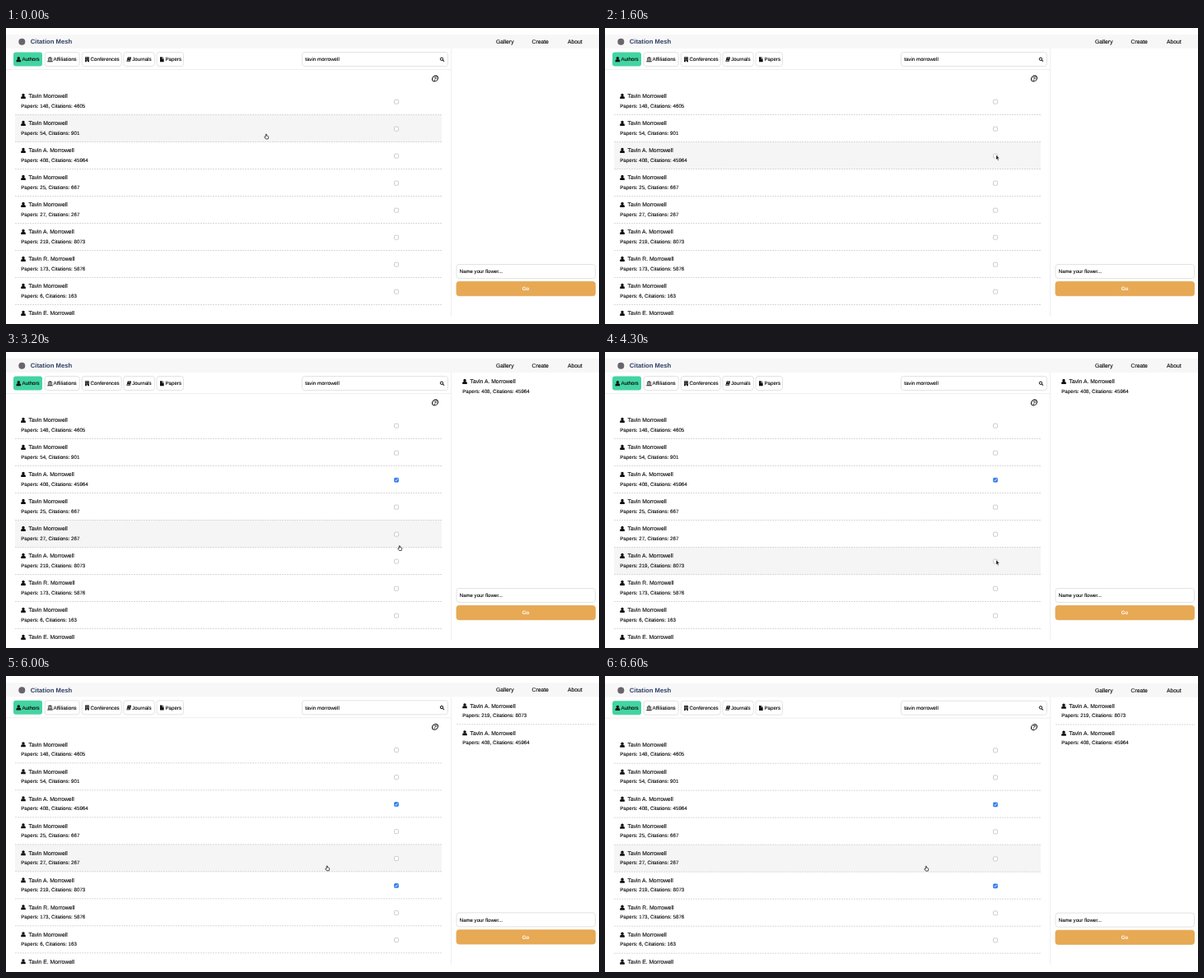
An HTML page for the animation above (6.7 s loop, 720 px wide and 360 px high).

```html
<!DOCTYPE html>
<html lang="en">
<head>
<meta charset="utf-8">
<title>Citation Mesh</title>
<style>
  html, body { margin: 0; width: 100%; height: 100%; overflow: hidden; background: #fff; }
  svg { display: block; width: 720px; height: 360px; font-family: "Liberation Sans", Arial, sans-serif; fill: #111; }
  text { text-rendering: geometricPrecision; stroke: currentColor; stroke-width: .12; }
  .box { fill: #fff; stroke: #dcdcdc; stroke-width: .8; }
  .rule { stroke: #efefef; }
  .dash { stroke: #cfcfcf; stroke-width: .8; stroke-dasharray: 2 1; }
  .check rect { fill: #fff; stroke: #b8b8b8; stroke-width: .7; }
  .check path { fill: none; stroke: none; }
  .check.on rect { fill: #2f7cec; stroke: #2f7cec; }
  .check.on path { stroke: #fff; stroke-width: .9; }
  .strong { font-weight: 700; stroke: none; }
</style>
</head>
<body>
<svg id="stage" viewBox="0 0 720 360"></svg>
<script>
const LOOP = 6700, STEP = 100, ROW = 33, TOP = 72.5;

// middle initial, papers, citations
const authors = [
  ['', 148, 4605], ['', 54, 901], ['A. ', 408, 45964], ['', 25, 667], ['', 27, 267],
  ['A. ', 219, 8073], ['R. ', 173, 5876], ['', 6, 163], ['E. ', 12, 240]
];
const picks = [{ row: 2, at: 1900 }, { row: 5, at: 4500 }];
const LIST_DELAY = 100;

// time and pointer tip
const path = [
  [0, 316, 129], [1200, 475, 154.5], [2600, 475, 154.5], [3200, 478, 235.5],
  [3900, 475, 253], [5200, 475, 253], [5600, 401, 238], [5900, 390, 230.5]
];

const icons = {
  user: '<circle cy="-1.5" r="1.7"/><path d="M-2.8 3V1.6Q-2.8 0-1.3 0H1.3Q2.8 0 2.8 1.6V3z"/>',
  bank: '<path d="M-3.2-1.5L0-3 3.2-1.5zM-3.2 2H3.2V3H-3.2zM-2.4-1h1v2.6h-1zM-.5-1h1v2.6h-1zM1.4-1h1v2.6h-1z"/>',
  building: '<path fill-rule="evenodd" d="M-2.4-3H2.4V3H.6V1.6H-.6V3H-2.4zM-1.4-2h.9v.9h-.9zM.5-2h.9v.9H.5zM-1.4-.3h.9v.9h-.9zM.5-.3h.9v.9H.5z"/>',
  book: '<path d="M-1.3-2.7H3L1.7 2.6H-2.8z"/><path d="M-2 1.5H1.4M-.4-1.2H1.5" stroke="#fff" stroke-width=".6"/>',
  file: '<path d="M-2.3-3H.4V-.8H2.4V3H-2.3zM1-3L2.4-1.4H1z"/>',
  search: '<path d="M.9.9L2.5 2.5" stroke="#111" stroke-width="1.1"/><circle cx="-.5" cy="-.5" r="1.7" fill="none" stroke="#111"/>',
  help: '<g transform="skewX(-12)"><circle r="3.4" fill="none" stroke="#111" stroke-width="1.1"/><text class="strong" y="2.1" font-size="6" text-anchor="middle">?</text></g>'
};

const icon = (name, x, y) => `<g transform="translate(${x} ${y})">${icons[name]}</g>`;
const text = (s, x, y, size, attrs = '') => `<text x="${x}" y="${y + size * .36}" font-size="${size}" ${attrs}>${s}</text>`;
const box = (x, y, w, h, attrs = 'class="box"') => `<rect x="${x}" y="${y}" width="${w}" height="${h}" rx="3" ${attrs}/>`;
const line = (x1, x2, y, cls) => `<path class="${cls}" d="M${x1} ${y}H${x2}"/>`;
const rowTop = i => TOP + i * ROW;

const card = ([initial, papers, citations], x, y) =>
  icon('user', x + 2.8, y) +
  text(`Tavin ${initial}Morrowell`, x + 9.3, y, 6.8) +
  text(`Papers: ${papers}, Citations: ${citations}`, x, y + 11.5, 6.2);

const tab = ([label, glyph, x, w], i) =>
  box(x, 29.5, w, 17, i ? 'class="box"' : 'fill="#43d4a2"') +
  icon(glyph, x + 6.3, 38.2) + text(label, x + 10.4, 38.1, 6.2);

const row = (author, i) =>
  card(author, 18.2, rowTop(i) + 10.5) + line(11, 529, rowTop(i + 1), 'dash') +
  `<g class="check" transform="translate(474 ${rowTop(i) + 17.2})">
    <rect x="-2.5" y="-2.5" width="5" height="5" rx="1"/><path d="M-1.5 0L-.4 1.2 1.5-1.4"/></g>`;

const stage = document.getElementById('stage');
stage.innerHTML = `
  <clipPath id="screen"><path d="M0 0H720V350.4H0z"/></clipPath>
  <g id="page" clip-path="url(#screen)">
    <path fill="#f7f7f7" d="M0 8H720V25H0z"/>
    <circle cx="19.3" cy="16.8" r="4" fill="#6a646c"/>
    ${text('Citation Mesh', 29.8, 16.6, 7.7, 'class="strong" fill="#2f3f66"')}
    ${text('Gallery', 595, 16.5, 6.8)}${text('Create', 638.5, 16.5, 6.8)}${text('About', 682, 16.5, 6.8)}
    ${line(0, 540, 50.5, 'rule')}<path class="rule" d="M540.5 25V351"/>
    ${[['Authors', 'user', 9, 35], ['Affiliations', 'bank', 47.2, 42], ['Conferences', 'building', 92.2, 48],
       ['Journals', 'book', 142.8, 37.5], ['Papers', 'file', 183, 32.5]].map(tab).join('')}
    ${box(359.5, 29.5, 177, 17)}${text('tavin morrowell', 363.2, 38, 6.2)}${icon('search', 529.5, 38.2)}
    ${icon('help', 521, 61.5)}
    <rect id="hover" x="11" width="518" height="${ROW}" fill="#f5f5f5"/>
    ${authors.map(row).join('')}
    <g id="chosen"></g>
    ${box(547, 287.5, 168.5, 17)}${text('Name your flower...', 550.8, 296, 6.05)}
    ${box(547, 308.5, 168.5, 17.2, 'fill="#e8a954" stroke="#e2a655" stroke-width=".8"')}
    ${text('Go', 631, 317.2, 6.3, 'class="strong" fill="#fff" text-anchor="middle"')}
    <g id="pointer">
      <path transform="scale(.9)" fill="#fff" stroke="#222" stroke-width=".9" d="M-.8.4Q0-.5.5.4V2.2L2.5 2.8Q3.3 3.2 3 4.2L2.4 6.6H-.6L-2.5 4.1Q-2.3 3-.8 3.7z"/>
      <path stroke="#fff" stroke-width=".3" d="M0 0V5.6L1.3 4.4 2.1 6.7 3 6.3 2.1 4.1H3.8z"/>
    </g>
  </g>`;

const [page, hover, chosen, pointer] = ['page', 'hover', 'chosen', 'pointer'].map(id => document.getElementById(id));
const checks = stage.querySelectorAll('.check');
const [hand, arrow] = pointer.children;

function pointerAt(t) {
  const next = path.findIndex(p => p[0] > t);
  if (next < 0) return path.at(-1).slice(1);
  const [t0, x0, y0] = path[next - 1], [t1, x1, y1] = path[next];
  const k = 1 - (1 - (t - t0) / (t1 - t0)) ** 2;
  return [x0 + (x1 - x0) * k, y0 + (y1 - y0) * k];
}

function draw(t) {
  const [x, y] = pointerAt(t);
  const over = Math.floor((y - TOP) / ROW);
  const onCheck = Math.abs(x - 474) < 3 && Math.abs(y - rowTop(over) - 17.2) < 3;
  hover.setAttribute('y', rowTop(over));
  pointer.setAttribute('transform', `translate(${x} ${y})`);
  hand.style.display = onCheck ? 'none' : '';
  arrow.style.display = onCheck ? '' : 'none';

  picks.forEach(p => checks[p.row].classList.toggle('on', t >= p.at));
  chosen.innerHTML = picks.filter(p => t >= p.at + LIST_DELAY).reverse()
    .map((p, i) => (i ? line(547, 716, 25.4 + i * ROW, 'dash') : '') + card(authors[p.row], 554.2, 36 + i * ROW)).join('');

  // the whole screen dips and settles at the end
  const dip = t < 5950 ? 0 : 1.7 * Math.sin(Math.PI * (t - 5950) / 750);
  page.setAttribute('transform', `translate(0 ${dip})`);
}

function tick() {
  const t = performance.now() % LOOP;
  draw(Math.floor(t / STEP) * STEP);
  requestAnimationFrame(tick);
}
tick();
</script>
</body>
</html>
```
